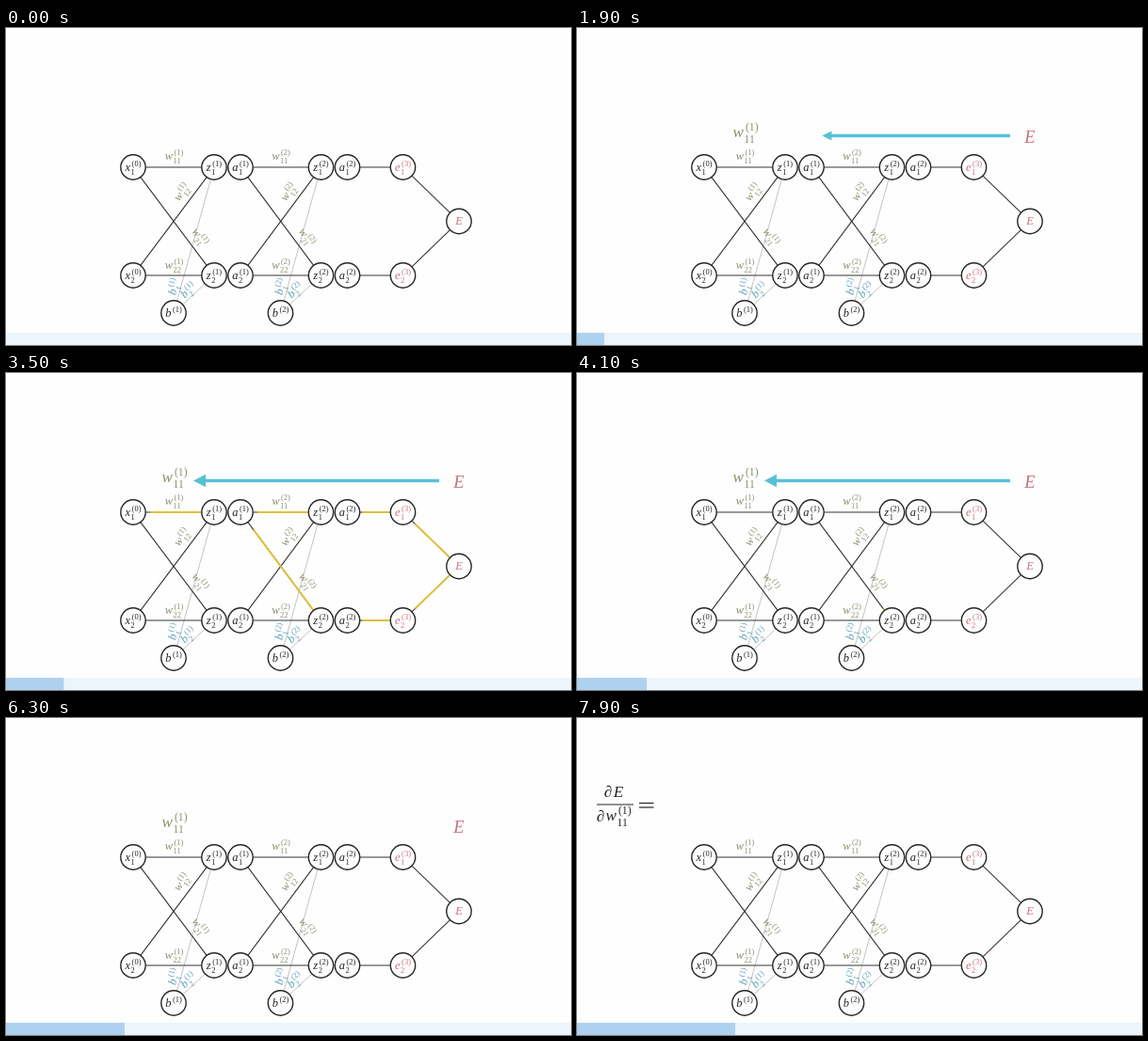
Recreate the animation shown at these times as an HTML page with a canvas. Size 600 px wide and 337 px high, loop 8000 ms.

```html
<!DOCTYPE html>
<html lang="en">
<head>
<meta charset="utf-8">
<title>Backpropagation</title>
<style>
html, body { margin: 0; width: 100%; height: 100%; overflow: hidden; background: #fefefe; }
canvas { display: block; width: 600px; height: 337px; }
</style>
</head>
<body>
<canvas id="stage"></canvas>
<script>
const W = 600, H = 337, LOOP = 8000, STEP = 100;
const INK = '#262626', WIRE = '#363636', OLIVE = '#87926f', BLUE = '#5c9fba', PINK = '#c4727f',
      YELLOW = '#e0c23a', TEAL = '#57c1d3';
const TOP = 148, LOW = 263, R = 13.2, SMALL = 12.5, BIG = 17.2;
const canvas = document.getElementById('stage');
const ctx = canvas.getContext('2d');
const dpr = window.devicePixelRatio || 1;
canvas.width = W * dpr;
canvas.height = H * dpr;

const lerp = (a, b, p) => a + (b - a) * p;
const clamp = v => Math.max(0, Math.min(1, v));
const sigmoid = v => 1 / (1 + Math.exp(-v));

// Smooth 0..1 progress between two times
function ease(t, from, to) {
  const p = clamp((t - from) / (to - from));
  const low = sigmoid(-5);
  return clamp((sigmoid(10 * (p - 0.5)) - low) / (1 - 2 * low));
}

function mix(a, b, p) {
  const part = (c, i) => parseInt(c.slice(i, i + 2), 16);
  return `rgb(${[1, 3, 5].map(i => Math.round(lerp(part(a, i), part(b, i), p)))})`;
}

function font(size, style = '') {
  ctx.font = `${style} ${size}px "Liberation Serif", "Noto Serif", serif`;
}

function line(x1, y1, x2, y2, color, width) {
  ctx.strokeStyle = color;
  ctx.lineWidth = width;
  ctx.beginPath();
  ctx.moveTo(x1, y1);
  ctx.lineTo(x2, y2);
  ctx.stroke();
}

// Italic letter with stacked superscript and subscript, centred on x, y
function label(x, y, base, sub, sup, color, size = SMALL, angle = 0) {
  const script = size * 0.68;
  ctx.save();
  ctx.translate(x, y);
  ctx.rotate(angle * Math.PI / 180);
  ctx.fillStyle = color;
  font(script);
  const scriptWidth = sup ? ctx.measureText(sup).width + size * 0.12 : 0;
  font(size, 'italic');
  const baseWidth = ctx.measureText(base).width;
  const left = -(baseWidth + scriptWidth) / 2;
  ctx.fillText(base, left, size * 0.31);
  font(script);
  const right = left + baseWidth;
  if (sup) ctx.fillText(sup, right + size * 0.12, -size * 0.09);
  if (sub) ctx.fillText(sub, right + size * 0.04, size * 0.62);
  ctx.restore();
}

function node(x, y, base, sub, sup, color = INK) {
  ctx.beginPath();
  ctx.arc(x, y, R, 0, Math.PI * 2);
  ctx.fillStyle = '#fefefe';
  ctx.fill();
  ctx.strokeStyle = INK;
  ctx.lineWidth = 1.4;
  ctx.stroke();
  label(x, y, base, sub, sup, color);
}

// Edge between two circle centres, trimmed to their rims; right end first
function edge(x1, y1, x2, y2) {
  const d = Math.hypot(x2 - x1, y2 - y1);
  const ux = (x2 - x1) / d * R, uy = (y2 - y1) / d * R;
  return [x2 - ux, y2 - uy, x1 + ux, y1 + uy];
}

const layers = [{ from: 135, to: 221, bias: 178 }, { from: 249, to: 334.5, bias: 291.5 }];
const tail = [
  edge(362.5, TOP, 421.5, TOP), edge(362.5, LOW, 421.5, LOW),
  edge(421.5, TOP, 481, 205.5), edge(421.5, LOW, 481, 205.5)
];
const edges = [...tail];
for (const { from, to } of layers)
  for (const y1 of [TOP, LOW])
    for (const y2 of [TOP, LOW]) edges.push(edge(from, y1, to, y2));
const active = [
  ...tail, edge(135, TOP, 221, TOP),
  edge(249, TOP, 334.5, TOP), edge(249, TOP, 334.5, LOW)
];

function network(glow) {
  for (const { to, bias } of layers)
    for (const y of [TOP, LOW]) line(bias, 303, to, y, '#b4b4b4', 0.8);
  for (const e of edges) line(...e, WIRE, 1.1);
  if (glow > 0.003)
    for (const [x1, y1, x2, y2] of active)
      line(x1, y1, lerp(x1, x2, glow), lerp(y1, y2, glow), YELLOW, 1.9);

  layers.forEach(({ to, bias }, i) => {
    const sup = `(${i + 1})`;
    label(bias + 0.5, 136.5, 'w', '11', sup, OLIVE);
    label(bias + 0.5, 252.5, 'w', '22', sup, OLIVE);
    label(bias + 8.5, 174.5, 'w', '12', sup, OLIVE, SMALL, -54);
    label(bias + 28, 222, 'w', '21', sup, OLIVE, SMALL, 54);
    label(bias + 0.5, 275, 'b', '1', sup, BLUE, SMALL, -74);
    label(bias + 15.5, 279, 'b', '2', sup, BLUE, SMALL, -43);
    node(bias, 303, 'b', '', sup);
    [TOP, LOW].forEach((y, row) => {
      node(to, y, 'z', `${row + 1}`, sup);
      node(to + 28, y, 'a', `${row + 1}`, sup);
    });
  });
  [TOP, LOW].forEach((y, row) => {
    node(135, y, 'x', `${row + 1}`, '(0)');
    node(421.5, y, 'e', `${row + 1}`, '(3)', PINK);
  });
  node(481, 205.5, 'E', '', '', PINK);
}

function arrow(grow, alpha) {
  if (grow < 0.003 || alpha < 0.003) return;
  const x = lerp(460, 199, grow), y = 114.5;
  ctx.globalAlpha = alpha;
  line(460, y, x + 11 * grow, y, TEAL, 3.3 * Math.min(1, grow * 2));
  ctx.fillStyle = TEAL;
  ctx.beginPath();
  ctx.moveTo(x, y);
  ctx.lineTo(x + 13 * grow, y - 6.7 * grow);
  ctx.lineTo(x + 13 * grow, y + 6.7 * grow);
  ctx.fill();
  ctx.globalAlpha = 1;
}

function terms(t) {
  const rise = ease(t, 0, 700), riseE = ease(t, 435, 1435);
  const go = ease(t, 6300, 7250);
  if (rise > 0)
    label(lerp(lerp(178.5, 179, rise), 44, go), lerp(lerp(136.5, 111, rise), 104, go),
      'w', '11', '(1)', mix(OLIVE, INK, go), lerp(SMALL, BIG, rise));
  if (riseE > 0)
    label(lerp(481, 44, go), lerp(lerp(205.5, 116, riseE), 79, go), 'E', '', '',
      mix(PINK, INK, go), lerp(lerp(SMALL, 18.5, riseE), BIG, go));
  if (go > 0) {
    ctx.globalAlpha = go;
    label(33, 79, '∂', '', '', INK, BIG);
    label(25, 104.5, '∂', '', '', INK, BIG);
    line(21, 92, lerp(21, 60, go), 92, INK, 1.1);
    ctx.globalAlpha = 1;
  }
  const equal = ease(t, 7250, 7800);
  if (equal > 0)
    for (const y of [90.5, 95]) line(66, y, lerp(66, 81.5, equal), y, INK, 1.2);
}

const marks = [[0, 0], [900, 14], [1100, 20], [1800, 27], [2800, 46.5], [4100, 74],
  [5400, 102], [6300, 126], [7900, 168], [8000, 170.6]];
function progress(t) {
  const i = Math.max(1, marks.findIndex(m => m[0] >= t));
  const [t0, x0] = marks[i - 1], [t1, x1] = marks[i];
  return lerp(x0, x1, (t - t0) / (t1 - t0));
}

function draw(t) {
  ctx.setTransform(dpr, 0, 0, dpr, 0, 0);
  ctx.fillStyle = '#fefefe';
  ctx.fillRect(0, 0, W, H);
  ctx.fillStyle = '#ebf5fb';
  ctx.fillRect(0, 324, W, 13);
  ctx.fillStyle = '#aed1f0';
  ctx.fillRect(0, 324, progress(t), 13);

  const glow = ease(t, 2190, 3190) - ease(t, 3230, 4230)
             + ease(t, 4230, 5190) - ease(t, 5350, 6250);
  network(glow);
  arrow(ease(t, 1435, 2190), 1 - ease(t, 5350, 6250));
  terms(t);
}

const start = performance.now();
function tick() {
  const t = (performance.now() - start) % LOOP;
  draw(Math.floor(t / STEP) * STEP);
  requestAnimationFrame(tick);
}
tick();
</script>
</body>
</html>
```
